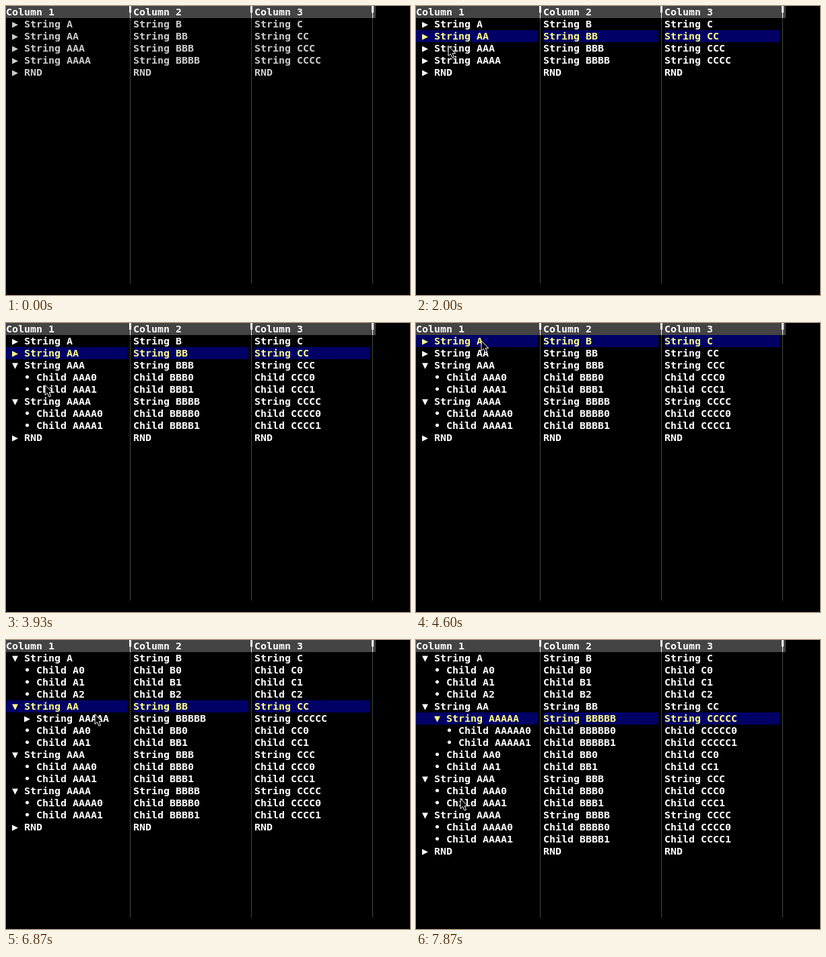
These frames come from a looping animation (600 px wide and 431 px high, 8 s). An HTML page:

```html
<!DOCTYPE html>
<html lang="en">
<head>
<meta charset="utf-8">
<title>Tree list</title>
<style>
  html, body { margin: 0; width: 100%; height: 100%; overflow: hidden; background: #000; }
  svg { display: block; width: 100%; height: 100%; }
  text { font: bold 14.95px "DejaVu Sans Mono", "Liberation Mono", monospace; white-space: pre; }
</style>
</head>
<body>
<svg viewBox="0 0 600 431" xmlns="http://www.w3.org/2000/svg">
  <rect width="600" height="431" fill="#000"/>
  <g id="frame"></g>
  <g id="rows"></g>
  <path id="cursor" d="M1 1.5V16.5L4.4 13.4L7 19.2L9.5 18.1L7.2 12.6H11.8Z"
        fill="#000" stroke="#fff" stroke-linejoin="round"/>
</svg>
<script>
const LOOP = 8000, TICK = 1000 / 15;   // everything changes on a 15 Hz grid
const CELL = 9, ROW = 18, WIDTH = 20 * CELL;
const LETTERS = "ABC";
const $ = id => document.getElementById(id);

const colX = i => i && i * WIDTH + CELL;
const rect = (x, y, w, h, fill) =>
  `<rect x="${x}" y="${y}" width="${w}" height="${h}" fill="${fill}"/>`;
const text = (x, row, str, fill) =>
  `<text x="${x}" y="${row * ROW + 14}" fill="${fill}">${str}</text>`;
const eachCol = draw => [...LETTERS].map((letter, i) => draw(i, letter)).join("");

// A node opens at the given tick; without a tick it stays closed.
const leaves = (key, n) => Array.from({ length: n }, (_, i) => ({ label: `Child ${key}${i}` }));
const branch = (key, opens, kids) => ({ label: `String ${key}`, opens, kids });
const tree = [
  branch("A", 71, leaves("A", 3)),
  branch("AA", 92, [branch("AAAAA", 108, leaves("AAAAA", 2)), ...leaves("AA", 2)]),
  branch("AAA", 40, leaves("AAA", 2)),
  branch("AAAA", 55, leaves("AAAA", 2)),
  { label: "RND", kids: [] }
];

const FOCUS = 13;
const clicks = [
  { at: 14, key: "A" }, { at: 24, key: "AA" }, { at: 69, key: "A" },
  { at: 90, key: "AA" }, { at: 105, key: "AAAAA" }
];

// Mouse moves: from one tick to another, ending at x, y, bowed to the right
const ENTER = 6;
const moves = [
  { from: 5, to: 7, x: 73, y: 21 },
  { from: 18, to: 20, x: 77, y: 51 },
  { from: 28, to: 37, x: 13, y: 67 },
  { from: 43, to: 52, x: 10, y: 117, bow: 53 },
  { from: 58, to: 66, x: 96, y: 25, bow: 28 },
  { from: 77, to: 81, x: 91, y: 104, bow: 10 },
  { from: 84, to: 86, x: 91, y: 95 },
  { from: 96, to: 98, x: 131, y: 109 },
  { from: 112, to: 118, x: 65, y: 235 }
];

const easeOut = u => 1 - (1 - u) ** 2.5;

function cursorAt(k) {
  let x = 75, y = 33;
  for (const m of moves) {
    if (k <= m.from) break;
    const p = easeOut(Math.min(1, (k - m.from) / (m.to - m.from)));
    x += (m.x - x) * p + (m.bow || 0) * 4 * p * (1 - p);
    y += (m.y - y) * p;
  }
  return [Math.round(x), Math.round(y)];
}

function visible(nodes, k, depth = 0) {
  return nodes.flatMap(node => {
    const open = k >= node.opens;
    const mark = !node.kids ? "•" : open ? "▼" : "▶";
    const self = { label: node.label, mark, depth };
    return open ? [self, ...visible(node.kids, k, depth + 1)] : [self];
  });
}

function drawRows(k) {
  const click = clicks.filter(c => c.at <= k).pop();
  const selected = click && `String ${click.key}`;
  const plain = k < FOCUS ? "#ccc" : "#fff";
  return visible(tree, k).map(({ label, mark, depth }, i) => {
    const row = i + 1, on = label === selected;
    const fill = on ? "#ff8" : plain;
    const x = CELL * (1 + 2 * depth);
    const bar = c => rect(colX(c), row * ROW, WIDTH * (c + 1) - colX(c), ROW, "#006");
    return (on ? eachCol(bar) : "") + text(x, row, mark, fill) +
      eachCol((c, letter) =>
        text(c ? colX(c) : x + 2 * CELL, row, label.replace(/A/g, letter), fill));
  }).join("");
}

function drawFrame() {
  return rect(0, 0, 3 * WIDTH + CELL, ROW, "#444") + eachCol(c => {
    const x = (c + 1) * WIDTH + 4;
    return text(colX(c), 0, `Column ${c + 1}`, "#fff") +
      rect(x - 1, 0, 3, 10, "#fff") + rect(x, 10, 1, 8, "#fff") +
      rect(x, ROW, 1, 22 * ROW, "#444");
  });
}

let last = -1;
function render(ms) {
  const k = Math.floor((ms % LOOP + 4) / TICK) % 120;
  if (k === last) return;
  last = k;
  $("rows").innerHTML = drawRows(k);
  $("cursor").setAttribute("visibility", k < ENTER ? "hidden" : "visible");
  $("cursor").setAttribute("transform", `translate(${cursorAt(k)})`);
}

$("frame").innerHTML = drawFrame();
const start = performance.now();
function loop() {
  render(performance.now() - start);
  requestAnimationFrame(loop);
}
loop();
</script>
</body>
</html>
```
